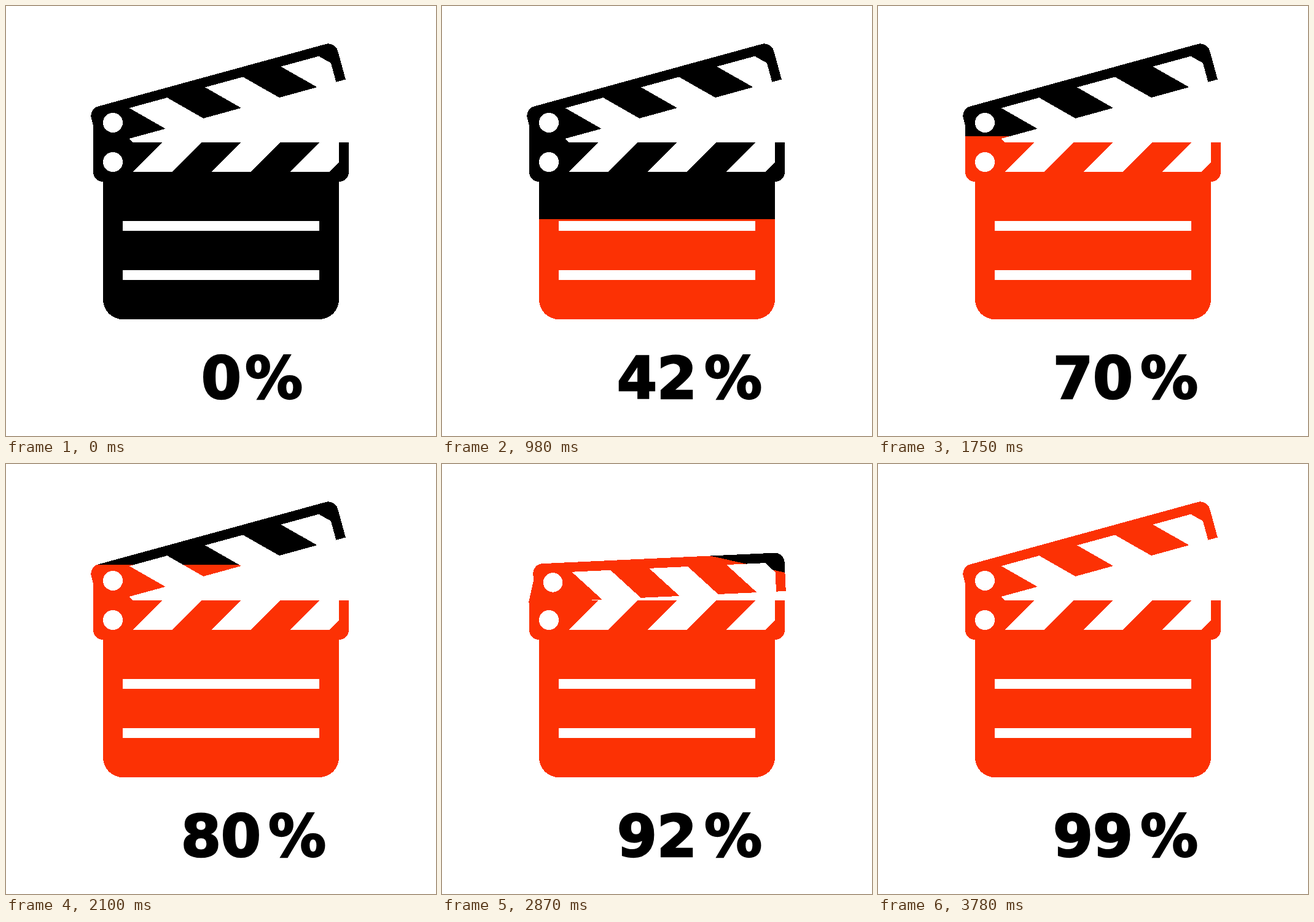
These frames come from a looping animation (700x700 px, 4200 ms). An HTML page:

```html
<!DOCTYPE html>
<html lang="en">
<head>
<meta charset="utf-8">
<title>Clapperboard loader</title>
<style>
  html, body { margin: 0; width: 100%; height: 100%; overflow: hidden; background: #fff; }
  svg { display: block; width: 100vw; height: 100vh; }
  path { fill-rule: evenodd; shape-rendering: crispEdges; }
  text { font: bold 94px "DejaVu Sans", sans-serif; text-anchor: middle; stroke: #000; stroke-width: 2.5px; }
</style>
</head>
<body>
<svg viewBox="0 0 700 700">
  <defs>
    <linearGradient id="level" gradientUnits="userSpaceOnUse" x1="0" y1="0" x2="0" y2="700">
      <stop class="edge" stop-color="#000"/>
      <stop class="edge" stop-color="#fc3104"/>
    </linearGradient>
    <!-- undoes the tilt of the arm so the level stays horizontal while it is open -->
    <linearGradient id="armLevel" href="#level" gradientTransform="rotate(15.3 174 190)"/>
  </defs>

  <path fill="url(#level)" d="
    M142 222H254L206 270H270L318 222H382L334 270H398L446 222H510L462 270H526L542 254V222H558
    V270a16 16 0 0 1-16 16V478a32 32 0 0 1-32 32H190a32 32 0 0 1-32-32V286a16 16 0 0 1-16-16Z
    M158 254a16 16 0 0 0 32 0a16 16 0 0 0-32 0Z
    M190 350H510V366H190Z M190 430H510V446H190Z"/>

  <g id="arm">
    <path fill="url(#level)" d="M142 192L152 220L201 216L206 222V228L142 232Z"/>
    <path fill="url(#armLevel)" transform="rotate(-15.3 174 190)" d="
      M142 222H254L206 174H270L318 222H382L334 174H398L446 222H510L462 174H526L542 190V222H558
      V174a16 16 0 0 0-16-16H158a16 16 0 0 0-16 16Z
      M158 190a16 16 0 0 0 32 0a16 16 0 0 0-32 0Z"/>
  </g>

  <text id="label" y="639"></text>
</svg>
<script>
  const LOOP = 4200, STEP = 70, STEPS = LOOP / STEP;
  const OPEN_ANGLE = 15;

  const arm = document.getElementById('arm');
  const label = document.getElementById('label');
  const edges = document.querySelectorAll('.edge');

  // y of the colour edge: rises fast, then settles above the board
  const levelAt = step => Math.round(47 + 0.066 * (STEPS - step) ** 2.2);

  // counts by threes, then by twos, then eases out
  const percentAt = step => Math.floor(Math.min(
    3 * step,
    20 + 2 * step,
    100 - 20 * ((STEPS - step) / 30) ** 2.27));

  // one clap: steady closing, steady opening
  const swingAt = step => OPEN_ANGLE * Math.max(0, Math.min((step - 32) / 7.7, (48 - step) / 8.3));

  function draw(step) {
    edges.forEach(edge => edge.setAttribute('offset', levelAt(step) / 700));

    // the arm drifts and shrinks slightly as it closes
    const swing = swingAt(step);
    arm.setAttribute('transform',
      `translate(${174 + 0.52 * swing} ${190 + 0.23 * swing}) rotate(${swing}) ` +
      `scale(${1 - 0.0012 * swing}) translate(-174 -190)`);

    const percent = percentAt(step);
    label.setAttribute('x', percent < 10 ? '350.5 436' : '317.5 382.5 474');
    label.textContent = percent + '%';
  }

  let start;
  function tick(now) {
    start ??= now;
    const step = Math.floor((now - start) % LOOP / STEP);
    draw(Math.min(step, step < 54 ? 51 : 54)); // the count rests before its last two values
    requestAnimationFrame(tick);
  }
  draw(0);
  requestAnimationFrame(tick);
</script>
</body>
</html>
```
